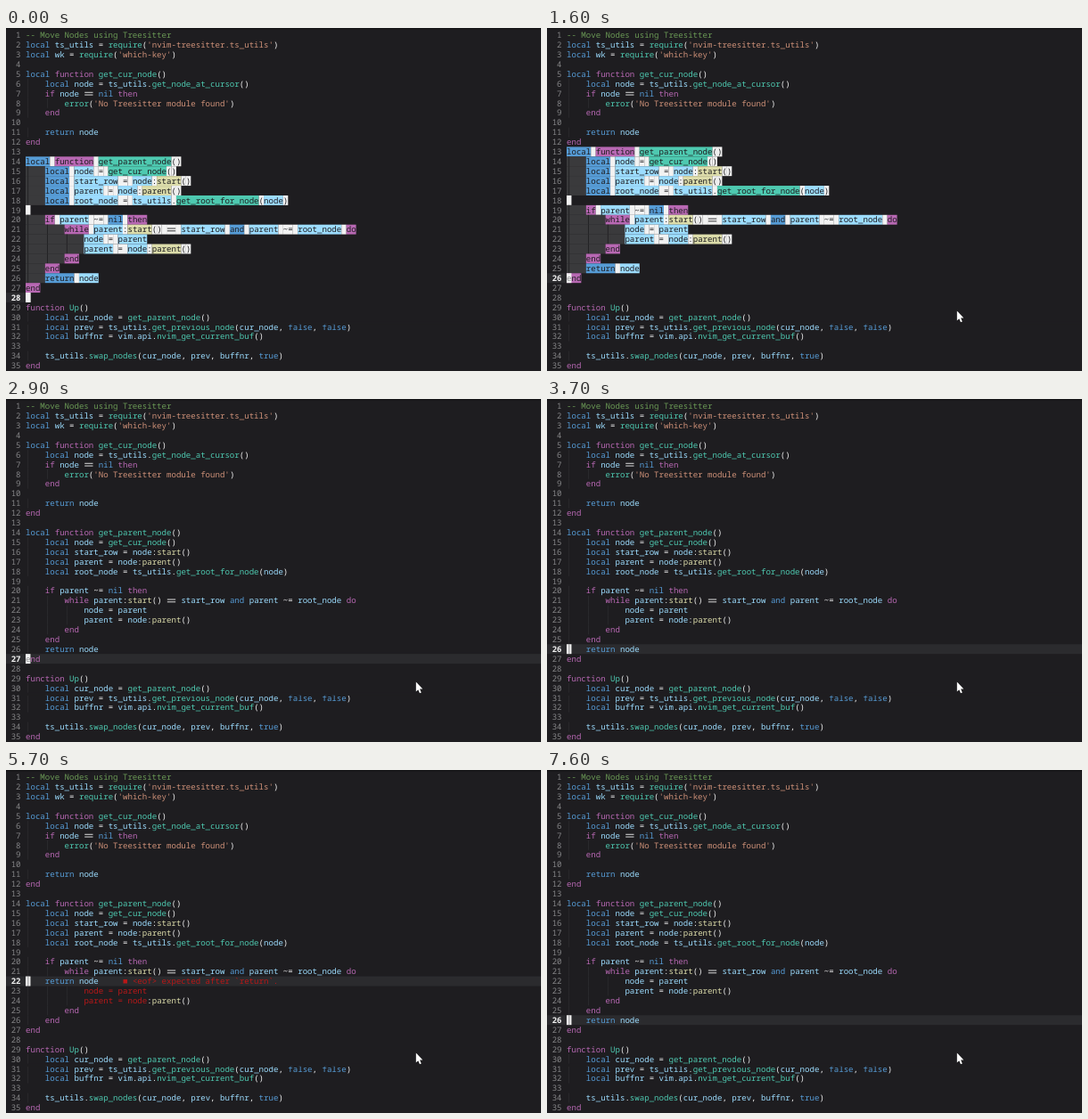
Animation, 600 px wide and 385 px high, one loop 7700 ms. Source, as an HTML page with a canvas:

```html
<!DOCTYPE html>
<html lang="en">
<head>
<meta charset="utf-8">
<title>Moving nodes in the editor</title>
<style>
html, body { margin: 0; width: 100%; height: 100%; overflow: hidden; background: #1e1d20; }
canvas { display: block; width: 600px; height: 385px; }
</style>
</head>
<body>
<canvas id="stage"></canvas>
<script>
const W = 600, H = 385, LOOP = 7700;
const CELL = 5.45, ROW = 10.91, LEFT = 22, TOP = 2.5;
const FONT = '9.08px "Noto Sans Mono", "DejaVu Sans Mono", monospace';
const C = {
  bg: '#1e1d20', line: '#2b2b2e', indent: '#3a3a3c', guide: '#2d2d30', number: '#858587',
  text: '#f2f2f2', blue: '#569cd6', name: '#9cdcfe', pink: '#b868b3', call: '#4ec9b0',
  method: '#dcdcaa', string: '#ce9178', comment: '#6a9955', error: '#b81818', warn: '#f0951e'
};

const SOURCE = `-- Move Nodes using Treesitter
local ts_utils = require('nvim-treesitter.ts_utils')
local wk = require('which-key')

local function get_cur_node()
    local node = ts_utils.get_node_at_cursor()
    if node == nil then
        error('No Treesitter module found')
    end

    return node
end

local function get_parent_node()
    local node = get_cur_node()
    local start_row = node:start()
    local parent = node:parent()
    local root_node = ts_utils.get_root_for_node(node)

    if parent ~= nil then
        while parent:start() == start_row and parent ~= root_node do
            node = parent
            parent = node:parent()
        end
    end
    return node
end

function Up()
    local cur_node = get_parent_node()
    local prev = ts_utils.get_previous_node(cur_node, false, false)
    local buffnr = vim.api.nvim_get_current_buf()

    ts_utils.swap_nodes(cur_node, prev, buffnr, true)
end`.split('\n');

// Each step holds from its time until the next one.
const BLOCK = [[0, 14], [600, 13], [800, 12], [1300, 13], [1900, 14]];
const RETURN = [[0, 26], [4200, 25], [4400, 24], [4600, 23], [4800, 22],
  [5800, 23], [6000, 24], [6200, 25], [6400, 26]];

const canvas = document.getElementById('stage');
const ctx = canvas.getContext('2d');
const dpr = window.devicePixelRatio || 1;
canvas.width = W * dpr;
canvas.height = H * dpr;

const held = (steps, t) => steps.filter(s => s[0] <= t).pop()[1];
const colX = col => LEFT + col * CELL;
const rowY = row => TOP + (row - 1) * ROW;

function box(x, y, w, h, color) {
  ctx.fillStyle = color;
  ctx.fillRect(x, y, w, h);
}

function write(str, col, row, color, weight = 500) {
  ctx.font = weight + ' ' + FONT;
  ctx.fillStyle = color;
  ctx.fillText(str, colX(col), rowY(row) + 8.7);
}

function move(lines, from, count, to) {
  lines.splice(to - 1, 0, ...lines.splice(from - 1, count));
}

function colorOf(token, before, after) {
  if (token.startsWith('--')) return C.comment;
  if (token[0] === "'") return C.string;
  if (/^(function|if|then|while|do|end)$/.test(token)) return C.pink;
  if (/^(local|nil|return|and|true|false)$/.test(token)) return C.blue;
  if (!/^\w/.test(token)) return C.text;
  if (after !== '(') return C.name;
  return before === ':' ? C.method : C.call;
}

function tokens(line) {
  const pattern = /--.*|'[^']*'|\w+|==|~=|[^\w']/g;
  return [...line.matchAll(pattern)].map(m => ({
    str: m[0],
    col: m.index,
    color: colorOf(m[0], line[m.index - 1], line[m.index + m[0].length])
  }));
}

function stateAt(t) {
  const lines = SOURCE.slice();
  const block = held(BLOCK, t), ret = held(RETURN, t);
  const visual = t < 2600;
  const s = { lines, visual, ret, notes: [], mouse: t >= 600, late: t >= 5400 };
  move(lines, 14, 14, block);
  if (visual) {
    s.first = block;
    s.cursor = t < 100 ? 28 : block + 13;
  } else {
    move(lines, 26, 1, ret);
    s.cursor = t < 3400 ? 27 : ret;
  }
  s.broken = block === 12;
  const eof = '<eof> expected after `return`.';
  if (s.broken && t >= 1000) {
    s.notes = [
      [5, 1, 'Unused functions.', C.text],
      [11, 1, eof, C.error],
      [12, 2, 'Unused functions.', C.text],
      [13, 1, 'Redefined local `node`.', C.text],
      [30, 1, 'Undefined global `get_parent_node`.', C.warn]
    ];
  } else if (ret < 24) {
    s.notes = [[ret, 1, eof, C.error]];
  }
  return s;
}

function drawToken(tok, row, color) {
  if (tok.str !== '==') return write(tok.str, tok.col, row, color);
  const y = rowY(row) + ROW / 2;
  for (const dy of [-1.6, 1.2]) box(colX(tok.col) + 0.8, y + dy, CELL * 2 - 1.6, 0.9, color);
}

function drawLine(s, row) {
  const line = s.lines[row - 1], y = rowY(row);
  const indent = line.search(/\S|$/);
  const selected = s.visual && row >= s.first && row <= s.cursor;
  const current = row === s.cursor;

  if (current) box(0, y, s.visual ? LEFT : W, ROW, C.line);
  write(String(row).padStart(3), -4, row, current ? C.text : C.number, current ? 700 : 500);

  if (selected) {
    if (!line) box(LEFT, y, CELL, ROW, C.text);
    box(LEFT, y, indent * CELL, ROW, C.indent);
  }
  for (let col = 0; col < indent; col += 4) {
    box(colX(col) + 2.3, y, 0.8, ROW, selected ? C.bg : C.guide);
  }

  const wrong = s.ret < 24 && row > s.ret && row < 25;
  const limit = line.includes(':') && !s.late ? 21 : 25;
  for (const tok of tokens(line)) {
    if (tok.col < indent) continue;
    let color = tok.color;
    if (s.broken && row === 26) color = C.name;
    if (wrong && tok.col < limit) color = C.error;
    if (selected) {
      box(colX(tok.col), y, tok.str.length * CELL, ROW, color);
      color = C.bg;
    }
    if (tok.str !== ' ') drawToken(tok, row, color);
  }

  if (current) {
    box(LEFT, y, CELL, ROW, C.text);
    if (indent) box(LEFT + 2.5, y, 0.8, ROW, '#77777a');
    else if (line) write(line[0], 0, row, '#8c8c8e');
  }
}

function drawNote([row, count, message, color], lines) {
  const col = lines[row - 1].length + 5;
  for (let i = 0; i < count; i++) {
    box(colX(col + i) + 0.5, rowY(row) + 3.4, 4.5, 4.5, color);
  }
  write(message, col + count + 1, row, color);
}

function drawMouse(x, y) {
  const points = [[0, 0], [0, 11], [2.4, 8.8], [4.2, 12.8], [6, 12], [4.3, 8.1], [7.6, 8]];
  ctx.beginPath();
  for (const [dx, dy] of points) ctx.lineTo(x + dx, y + dy);
  ctx.closePath();
  ctx.fillStyle = '#fff';
  ctx.strokeStyle = '#111';
  ctx.lineWidth = 0.8;
  ctx.stroke();
  ctx.fill();
}

function draw(t) {
  const s = stateAt(t);
  ctx.setTransform(dpr, 0, 0, dpr, 0, 0);
  ctx.textRendering = 'geometricPrecision';
  box(0, 0, W, H, C.bg);
  box(0, 0, W, 1.5, '#151517');
  for (let row = 1; row <= s.lines.length; row++) {
    drawLine(s, row);
    // A seam cuts the tops off this line.
    if (row === 31) box(LEFT, rowY(row), W, 3, C.bg);
  }
  for (const note of s.notes) drawNote(note, s.lines);
  if (s.mouse) drawMouse(459.8, 317.5);
}

function tick() {
  draw(performance.now() % LOOP);
  requestAnimationFrame(tick);
}
tick();
</script>
</body>
</html>
```
